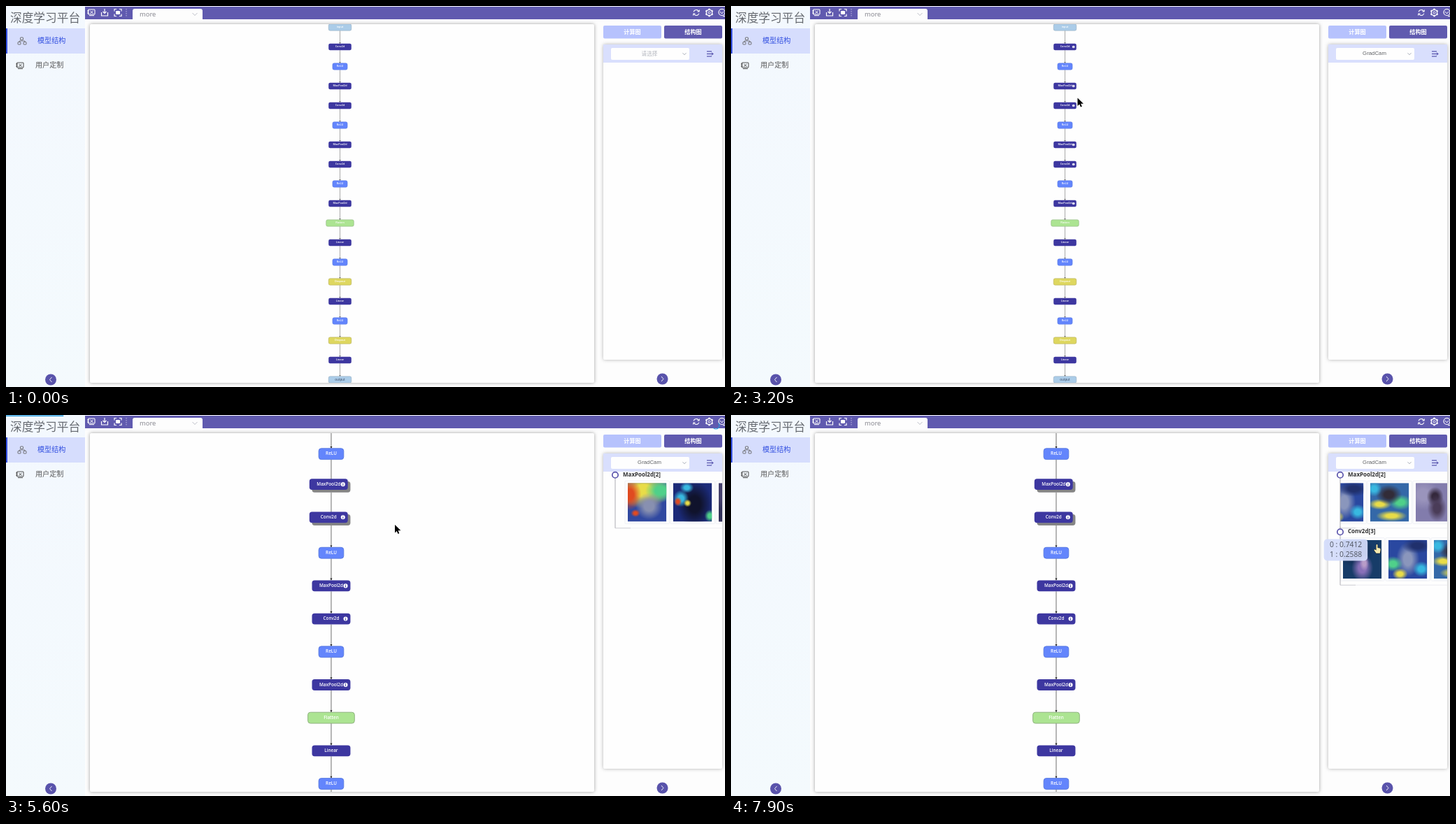
An HTML page with a canvas for the animation above (8000 ms loop, 1028 px wide and 545 px high).

```html
<!DOCTYPE html>
<html lang="zh">
<head>
<meta charset="utf-8">
<style>
html, body { margin: 0; width: 100%; height: 100%; overflow: hidden; background: #fdfdfd; }
canvas { display: block; width: 1028px; height: 545px; }
</style>
</head>
<body>
<canvas id="stage"></canvas>
<script>
const W = 1028, H = 545, LOOP = 8000;
const PURPLE = '#605aaf', LATIN = '"Noto Sans", "Open Sans", sans-serif',
  CJK = '"Noto Sans CJK SC", "Noto Sans CJK", sans-serif', ARIAL = '"Liberation Sans", sans-serif';
const canvas = document.getElementById('stage'), c = canvas.getContext('2d');
const dpr = window.devicePixelRatio || 1;
canvas.width = W * dpr;
canvas.height = H * dpr;

const clamp = (v) => Math.max(0, Math.min(1, v));
const ramp = (t, from, to) => clamp((t - from) / (to - from));

// ---------- drawing helpers ----------
function text(str, x, y, font, color, align = 'left') {
  c.font = font;
  c.fillStyle = color;
  c.textAlign = align;
  c.textBaseline = 'middle';
  c.fillText(str, x, y);
}
function box(x, y, w, h, r, fill, stroke, lineWidth = 1) {
  c.beginPath();
  c.roundRect(x, y, w, h, r);
  if (fill) { c.fillStyle = fill; c.fill(); }
  if (stroke) { c.strokeStyle = stroke; c.lineWidth = lineWidth; c.stroke(); }
}
function path(color, width, ...pts) {
  c.beginPath();
  for (let i = 0; i < pts.length; i += 2) c.lineTo(pts[i], pts[i + 1]);
  c.strokeStyle = color;
  c.lineWidth = width;
  c.stroke();
}
function arc(x, y, r, fill, stroke, width, from = 0, to = 7) {
  c.beginPath();
  c.arc(x, y, r, from, to);
  if (fill) { c.fillStyle = fill; c.fill(); }
  if (stroke) { c.strokeStyle = stroke; c.lineWidth = width; c.stroke(); }
}
function group(draw, alpha = 1) {
  c.save();
  c.globalAlpha *= alpha;
  draw();
  c.restore();
}
function clip(x, y, w, h) {
  c.beginPath();
  c.rect(x, y, w, h);
  c.clip();
}
function shadowBox(x, y, w, h, r, fill, blur, color) {
  group(() => {
    c.shadowColor = color;
    c.shadowBlur = blur * dpr;
    box(x, y, w, h, r, fill);
  });
}

// ---------- fixed interface ----------
function screenIcon(x, y, color) {
  box(x - 4.5, y - 4, 9.5, 7, 1, null, color, 1.1);
  path(color, 1, x - 3, y + 4.7, x + 4, y + 4.7);
  path(color, 1, x - 6, y - 2, x - 3, y - 2);
  path(color, 1, x - 6, y + 1, x - 3, y + 1);
  path(color, 1, x - 1.5, y - 2, x + 2.5, y + 1.5);
  path(color, 1, x + 2.5, y - 2, x - 1.5, y + 1.5);
}
function sidebar() {
  const g = c.createLinearGradient(0, 0, 113, 545);
  g.addColorStop(0, '#f3f8fe');
  g.addColorStop(1, '#f4fafd');
  c.fillStyle = g;
  c.fillRect(0, 0, 113, H);
  text('深度学习平台', 6, 16.5, '500 16.7px ' + CJK, '#666a70');
  box(0, 32, 113, 36, 0, '#d6ddfd');
  box(0, 32, 2, 36, 0, '#3350e0');
  for (const [x, y] of [[20.5, 45], [17, 51.5], [25, 51.5]]) box(x, y, 4, 3.5, 0.5, null, '#666', 0.9);
  path('#666', 0.8, 19, 51, 19, 50, 27, 50, 27, 51);
  text('模型结构', 45, 49, '10.1px ' + CJK, '#3350e0');
  screenIcon(20, 85, '#555');
  text('用户定制', 42, 84.5, '10.1px ' + CJK, '#555');
}
function roundButton(x, y, dir) {
  arc(x, y, 8, '#5953ab');
  path('#fff', 0.9, x - 1.5 * dir, y - 3.5, x + 1.5 * dir, y, x - 1.5 * dir, y + 3.5);
}
function toolbar() {
  box(113, 1, W - 113, 18, 0, PURPLE);
  const white = '#fff';
  screenIcon(122, 9, white);
  path(white, 1.2, 141, 4, 141, 10);
  path(white, 1.2, 138.5, 8, 141, 10.5, 143.5, 8);
  path(white, 1.2, 136.5, 9, 136.5, 14, 145.5, 14, 145.5, 9);
  for (const [sx, sy] of [[1, 1], [1, -1], [-1, 1], [-1, -1]])
    path(white, 1.2, 160 + 5 * sx, 9.5 + 2 * sy, 160 + 5 * sx, 9.5 + 5 * sy, 160 + 2 * sx, 9.5 + 5 * sy);
  box(157, 7, 6, 5, 1, white);
  group(() => { c.setLineDash([1.5, 1.5]); path('#c9c6e8', 0.9, 172, 4, 172, 16); });
  box(181, 4, 100, 15, [3, 3, 0, 0], '#fdfdfd');
  text('more', 191, 12, '9.4px ' + LATIN, '#8a8a92');
  path('#b5b7c0', 0.9, 266.5, 10, 270, 13.5, 273.5, 10);

  arc(987, 9.5, 4, null, white, 1.1, 3.4, 5.9);
  arc(987, 9.5, 4, null, white, 1.1, 0.3, 2.8);
  path(white, 1.1, 991.5, 5.5, 991, 8, 988.5, 8);
  path(white, 1.1, 982.5, 13.5, 983, 11, 985.5, 11);
  for (let i = 0; i < 6; i++) {
    const a = i * Math.PI / 3 + Math.PI / 6, u = Math.cos(a), v = Math.sin(a);
    path(white, 2.4, 1005.5 + 4 * u, 9.5 + 4 * v, 1005.5 + 5.8 * u, 9.5 + 5.8 * v);
  }
  arc(1005.5, 9.5, 4.2, null, white, 1.3);
  arc(1005.5, 9.5, 1.6, null, white, 1);
  arc(1023.5, 9, 4.5, null, white, 1.2);
  path(white, 1, 1021, 8, 1023.5, 11, 1026, 8);
  path(white, 1.2, 1025, 14.5, 1028, 14.5);
}
function frame() {
  box(0, 0, W, H, 0, '#fdfdfd');
  sidebar();
  toolbar();
  shadowBox(120, 26, 721, 513, 2, '#fefefe', 5, 'rgba(0,0,0,.38)');
  box(854, 28, 83, 18.5, 2, '#b6c2fd');
  text('计算图', 895.5, 37, 'bold 8.2px ' + CJK, '#fff', 'center');
  box(941, 28, 83, 18.5, 2, PURPLE);
  text('结构图', 982.5, 37, 'bold 8.2px ' + CJK, '#fff', 'center');
  shadowBox(854, 55, 170, 451, 2, '#fefefe', 5, 'rgba(0,0,0,.3)');
  box(854, 55, 170, 26, 0, '#d9dffd');
  path('#4a45a5', 1.1, 1002, 65, 1009, 65);
  path('#4a45a5', 1.1, 1002, 68.5, 1011, 68.5);
  path('#4a45a5', 1.1, 1002, 72, 1009, 72);
  path('#4a45a5', 1, 1009, 66.5, 1011, 68.5, 1009, 70.5);
  roundButton(64, 534.5, -1);
  roundButton(938.5, 533.5, 1);
}

// ---------- network graph ----------
const STYLE = {
  input: [32.6, '#abcce8', '#fff', '#8ba3b5'], output: [32.6, '#abcce8', '#33415c', '#8ba3b5'],
  Conv2d: [32.6, '#3d37a0', '#fff'], MaxPool2d: [32.6, '#3d37a0', '#fff'], Linear: [32.6, '#3d37a0', '#fff'],
  ReLU: [21.2, '#6385fc', '#fff', '#5576dd'],
  Flatten: [39.6, '#ace492', '#fff', '#86a878'], Dropout: [32.6, '#ded75f', '#fff', '#aaa550']
};
const LAYERS = ('input Conv2d ReLU MaxPool2d Conv2d ReLU MaxPool2d Conv2d ReLU MaxPool2d ' +
  'Flatten Linear ReLU Dropout Linear ReLU Dropout Linear output').split(' ');
const PIVOT = [495.8, 131.5], NODE_H = 9.4;
const ICONS_AT = 2400, PRESS = { 3: 4200, 4: 5400 };

function node(name, y, t, pressed) {
  const [w, fill, ink, edge] = STYLE[name];
  let x = 477.5;
  if (pressed) {
    box(x - w / 2, y - NODE_H / 2, w, NODE_H, 2.2, '#858585');
    x -= 2.2;
    y -= 2.2;
  }
  box(x - w / 2, y - NODE_H / 2, w, NODE_H, 2.2, fill, edge, 0.5);
  text(name, x, y, (name === 'output' ? '4.6px ' : '600 3.75px ') + '"Open Sans", sans-serif', ink, 'center');
  if (t >= ICONS_AT && /2d$/.test(name)) {
    arc(x + 12.2, y, 1.8, '#fff');
    path(fill, 0.6, x + 12.2, y - 1.1, x + 12.2, y - 0.6);
    path(fill, 0.6, x + 12.2, y - 0.2, x + 12.2, y + 1.1);
  }
}
function graph(t) {
  const wheel = Math.max(0, Math.min(3, (t - 3200) / 100));
  const zoom = 1.19 ** wheel;
  group(() => {
    clip(120, 26, 721, 513);
    c.translate(...PIVOT);
    c.scale(zoom, zoom);
    c.translate(-PIVOT[0], -PIVOT[1]);
    LAYERS.forEach((name, i) => {
      const y = 30.5 + 28 * i, top = y - NODE_H / 2;
      if (!i) return;
      path('#555', 0.5, 477.5, top - 28 + NODE_H, 477.5, top);
      c.fillStyle = '#222';
      c.beginPath();
      c.moveTo(476.6, top - 1.7);
      c.lineTo(478.4, top - 1.7);
      c.lineTo(477.5, top);
      c.fill();
    });
    LAYERS.forEach((name, i) => node(name, 30.5 + 28 * i, t, t >= PRESS[i]));
  });
}

// ---------- heat-map thumbnails: [colour, x, y, rx, ry] on a base tone ----------
const RED = '#e04a20', YEL = '#e8dc48', GRN = '#4fd08a', CYAN = '#38b8e0', DARK = '#10132c';
const THUMBS = [
  ['#3048a0', [YEL, .4, .2, .7, .45], [RED, .05, .3, .3, .4], [GRN, .85, .2, .4, .3], ['#8890b0', .55, .6, .35, .35], [RED, .2, .78, .12, .1]],
  ['#1b2a78', [DARK, .55, .55, .45, .6], [CYAN, .2, .4, .2, .22], [RED, .12, .48, .1, .12], [CYAN, .35, .12, .18, .14], [YEL, .37, .52, .1, .1], [GRN, .95, .85, .14, .16]],
  ['#45406c', ['#8c86b4', .5, .5, .35, .5], ['#303058', .1, .8, .3, .4], [CYAN, .62, .4, .12, .3], [YEL, .35, .48, .08, .09]],
  ['#173c68', ['#12264c', .3, .3, .5, .4], ['#8870b8', .5, .72, .28, .36], ['#b89cc8', .55, .6, .12, .2]],
  ['#2a48a0', ['#8a96bc', .5, .5, .3, .45], [GRN, .12, .62, .25, .2], [YEL, .3, .88, .2, .15], [CYAN, .85, .75, .22, .2], ['#20306c', .75, .15, .4, .2]],
  ['#3468a8', [YEL, .25, .55, .3, .14], [GRN, .78, .5, .3, .2], [YEL, .55, .85, .4, .14], ['#322c38', .48, .3, .34, .26], [CYAN, .1, .15, .2, .2]],
  ['#827cac', ['#9a94bc', .2, .3, .4, .4], ['#34283c', .5, .35, .22, .25], ['#4a3c58', .55, .65, .25, .35]]
];
const WARM_DOG = ['#3c78c8', [GRN, .4, .25, .7, .4], [YEL, .2, .35, .35, .3], [RED, .1, .12, .4, .16], [RED, .05, .5, .15, .2], ['#90a8cc', .6, .55, .3, .4], ['#2440a0', .85, .9, .3, .2]];
const CORNER_DOG = ['#1b2a78', [DARK, .55, .5, .45, .6], [GRN, .3, .47, .16, .14], [CYAN, .15, .2, .15, .15], [YEL, .93, .85, .16, .18], [RED, .94, .88, .08, .1]];

function thumb([base, ...blobs], x, y) {
  const size = 55.3;
  box(x - 4, y - 3, size + 8, size + 6, 1, '#fefefe', '#eef0f5', 1);
  group(() => {
    clip(x, y, size, size);
    c.translate(x, y);
    c.scale(size, size);
    c.fillStyle = base;
    c.fillRect(0, 0, 1, 1);
    for (const [color, bx, by, rx, ry] of blobs) group(() => {
      c.translate(bx, by);
      c.scale(rx, ry);
      const g = c.createRadialGradient(0, 0, 0.35, 0, 0, 1);
      g.addColorStop(0, color);
      g.addColorStop(1, color + '00');
      c.fillStyle = g;
      c.fillRect(-1, -1, 2, 2);
    });
  });
}
function featureRow(title, y, thumbs, scroll) {
  group(() => {
    clip(871, y, 153, 80);
    thumbs.forEach((th, i) => thumb(th, 889 + 65 * i - scroll, y + 11.5));
  });
  path('#a4a4ac', 0.9, 871, y + 4, 871, y + 76);
  path('#b8b8c0', 0.7, 871, y + 76, 893, y + 76);
  path('#e8e8ee', 0.7, 893, y + 76, 1024, y + 76);
  arc(871, y, 4.2, '#fff', '#5a54ac', 1.7);
  text(title, 882, y - 0.3, 'bold 8px ' + LATIN, '#303133');
}
const wheelScroll = (t, start, max) => t < start ? 0 : Math.min(max, 69.7 * ((t - start) / 100 + 1));
const LOADS = [[4200, 4700], [5400, 5900]];

function features(t) {
  if (t >= LOADS[1][1]) {
    path('#a4a4ac', 0.9, 871, 160, 871, 172);
    featureRow('Conv2d[3]', 167.3, [WARM_DOG, CORNER_DOG, ...THUMBS.slice(2)], wheelScroll(t, 7700, 209));
  }
  if (t >= LOADS[0][1]) featureRow('MaxPool2d[2]', 85.8, THUMBS, wheelScroll(t, 6700, 300));
}

// ---------- method selector ----------
const OPEN_AT = 1200, CHOOSE_AT = 2300;
function selector(t) {
  const chosen = t >= CHOOSE_AT, open = t >= OPEN_AT && !chosen;
  box(865, 60, 112, 17, 2, '#fefefe');
  if (chosen) text('GradCam', 920, 68.3, '7.8px ' + ARIAL, '#606266', 'center');
  else text('请选择', 920, 67.8, '7.6px ' + CJK, '#b4b7bf', 'center');
  const d = open ? -1.3 : 1.3;
  path('#a0a4b0', 0.9, 967.5, 68.5 - d, 970, 68.5 + d, 972.5, 68.5 - d);

  const grow = Math.min(ramp(t, OPEN_AT - 100, OPEN_AT + 200), 1 - ramp(t, CHOOSE_AT - 100, CHOOSE_AT + 200));
  if (grow > 0) group(() => {
    c.translate(0, 85);
    c.scale(1, grow);
    shadowBox(866, 0, 111, 93, 2, '#fefefe', 7, 'rgba(0,0,0,.16)');
    box(867, 80, 109, 10, 0, '#f8f8f9');
    if (t >= 1800) box(867, 4.5, 109, 20, 0, '#f5f7fa');
    ['GradCam', 'Gray', 'Guidedbp', 'PFV'].forEach((name, i) =>
      text(name, 879, 14.5 + 21.1 * i, '8.8px ' + LATIN, '#606266'));
  }, grow);

  const hint = Math.min(ramp(t, 500, 800), 1 - ramp(t, 1600, 1800));
  if (hint > 0) group(() => {
    box(865.5, 30, 73, 22, 2.5, '#fff', '#444', 0.9);
    box(918.5, 51, 5, 2, 0, '#fff');
    path('#444', 0.8, 918, 52, 921, 55, 924, 52);
    text('请选择特征图方法', 902, 40.6, '7.5px ' + CJK, '#303133', 'center');
  }, hint);
}

// ---------- loading bar ----------
function loading(t) {
  for (const [start, done] of LOADS) {
    if (t < start || t > done + 300) continue;
    const share = t >= done ? 1 : 0.08 + 0.02 * Math.max(0, (t - start - 200) / 100);
    group(() => {
      box(0, 0.6, W * share, 1.3, 0, '#2299dd');
      const a = Math.PI * (0.75 + (t - start) / 200);
      arc(1015, 15, 5, null, '#2299dd', 1.1, a, a + Math.PI);
    }, 1 - ramp(t, done, done + 400));
  }
}

// ---------- pointer: [time, x, y] ----------
const POINTER = [[200, 1006, 62], [600, 936, 64], [1200, 936, 64], [1500, 936, 73], [2000, 905, 96],
  [2400, 905, 96], [3100, 495.5, 131.5], [3600, 495.5, 131.5], [3800, 471, 116], [4000, 464, 101],
  [4400, 464, 101], [4900, 466, 147], [5300, 466, 147], [5600, 556, 157], [6200, 914.5, 124],
  [6900, 914.5, 124], [7300, 923.5, 185], [LOOP, 923.5, 185]];

function pointerAt(t) {
  const i = POINTER.findIndex(k => k[0] > t);
  const [t0, x0, y0] = POINTER[i - 1], [t1, x1, y1] = POINTER[i], k = (t - t0) / (t1 - t0);
  return [x0 + (x1 - x0) * k, y0 + (y1 - y0) * k];
}
const ARROW = new Path2D('M0 0V11.5L2.7 9L4.5 13L6.3 12.2L4.6 8.3H8.4Z');
const HAND = new Path2D('M-1 1Q0 -.8 1 1V5L4 5.6Q5.4 6 5.2 8L4.3 12.8H-1L-4 8.6Q-4.2 7 -2.6 7.4L-1 8.6Z');

function pointer(t) {
  if (t < 200) return;
  const [x, y] = pointerAt(t);
  const hand = t < 2500 || (t >= 4000 && t < 5400) || t >= 6200;
  if (t >= 6200) {
    const left = x - (t < 6300 ? 79.5 : 75.8), top = y - 7.6;
    box(left, top, 62.5, 31, 5, 'rgba(212,220,251,.94)');
    text('0 : 0.7412', left + 8.3, top + 8.2, '10.3px ' + LATIN, '#555a66');
    text('1 : 0.2588', left + 8.3, top + 23, '10.3px ' + LATIN, '#555a66');
  }
  c.save();
  c.translate(x, y);
  c.lineWidth = 1;
  c.strokeStyle = hand && t >= 6200 ? '#111' : '#fff';
  c.fillStyle = hand && t >= 6200 ? '#f6ebb0' : '#000';
  c.stroke(hand ? HAND : ARROW);
  c.fill(hand ? HAND : ARROW);
  c.restore();
}

function draw(now) {
  const t = Math.floor((now % LOOP) / 100) * 100;
  c.setTransform(dpr, 0, 0, dpr, 0, 0);
  frame();
  graph(t);
  features(t);
  selector(t);
  loading(t);
  pointer(t);
}
const begin = performance.now();
function tick() {
  draw(performance.now() - begin);
  requestAnimationFrame(tick);
}
tick();
</script>
</body>
</html>
```
